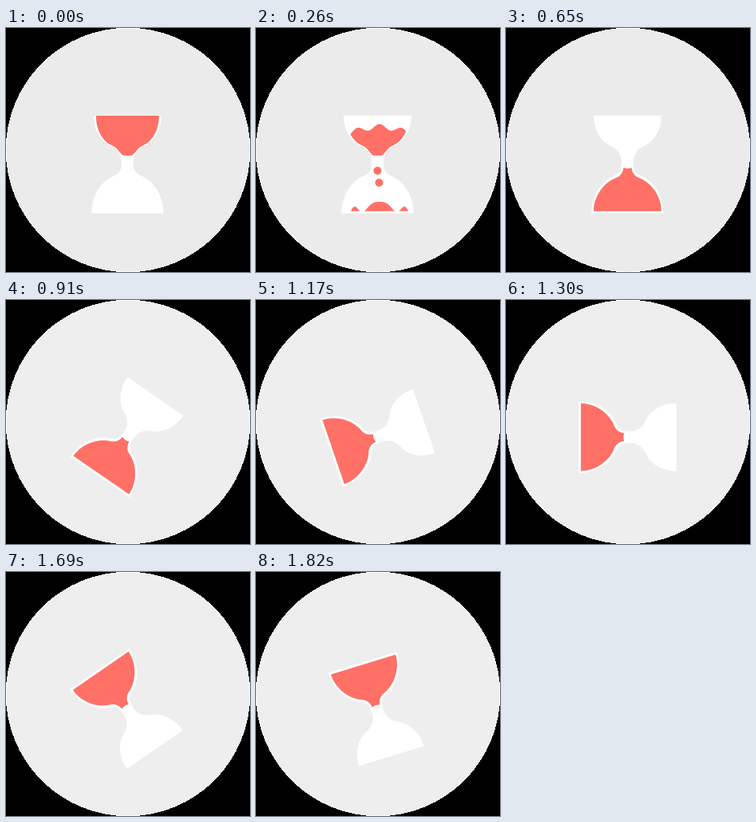
Write an HTML page that moves like this. It is 306 by 306 pixels and loops after 1950 ms.

```html
<!DOCTYPE html>
<html lang="en">
<head>
<meta charset="utf-8">
<title>Hourglass</title>
<style>
  html, body { margin: 0; width: 100%; height: 100%; overflow: hidden; background: #000; }
  svg { display: block; width: 100vw; height: 100vh; }
</style>
</head>
<body>
<svg viewBox="0 0 306 306">
  <defs>
    <clipPath id="upper"><path d="M-39.5-61H39.5C39.5-44 32-29 19-23.500C11-20.500 9-11 4-11H-4C-9-11-11-20.500-19-23.500C-32-29-39.5-44-39.5-61Z"/></clipPath>
    <clipPath id="lower"><path d="M-5 4Q0 6.500 5 4C6 12 10 15.500 16 17.500C29 23 42.300 39 42.500 58.700H-42.500C-42.300 39-29 23-16 17.500C-10 15.500-6 12-5 4Z"/></clipPath>
  </defs>
  <circle cx="153" cy="153" r="153.300" fill="#fff" shape-rendering="crispEdges"/>
  <circle id="disc" cx="153" cy="153" r="152.600"/>
  <g id="glass">
    <path fill="#fff" d="M-42.500-61.300H42.500C42.500-42 33-28 20-22.500C13-19.500 7.300-12 7.300-3C7.300 8 10 11.500 18 14.700C31 20 45 37 45.200 61.500H-45.200C-45 37-31 20-18 14.700C-10 11.500-7.300 8-7.300-3C-7.300-12-13-19.500-20-22.500C-33-28-42.500-42-42.500-61.300Z"/>
    <g fill="#ff7067">
      <path id="topSand" clip-path="url(#upper)"/>
      <path id="bottomSand" clip-path="url(#lower)"/>
      <g id="drops"><circle r="5"/><circle r="5"/></g>
    </g>
  </g>
</svg>
<script>
const STEP = 130, STEPS = 15, FALL = 5, TURN = STEPS - FALL;
const $ = id => document.getElementById(id);

// Pose of the sand while it falls: surface heights and wave sizes.
const poses = [
  { top: -75, topWave: 0, bottom: 70, bottomWave: 0, drops: [] },
  { top: -55, topWave: 3, bottom: 62, bottomWave: 4, drops: [[0, 0], [1, 14]] },
  { top: -47, topWave: 3.5, bottom: 52, bottomWave: 5, drops: [[0, 8], [2, 23]] },
  { top: -39.5, topWave: 3.8, bottom: 42.8, bottomWave: 5.8, drops: [[0.5, 15], [3.5, 29]] },
  { top: -22, topWave: 3, bottom: 29, bottomWave: 5, drops: [[0, 10]] },
  { top: 0, topWave: 0, bottom: -10, bottomWave: 0, drops: [] }
];

// Wavy surface with its crest at x = 2.5; a power above 1 tightens the outer waves.
function sand(level, wave, trough, power) {
  let d = 'M-48 75';
  for (let x = -48; x <= 48; x++) {
    const u = Math.abs(x - 2.5);
    const y = level - wave * Math.cos(Math.PI * (u / trough) ** power) + 0.006 * u * u;
    d += `L${x} ${y.toFixed(2)}`;
  }
  return d + 'L48 75Z';
}

function draw(now) {
  const step = Math.floor(now / STEP) % STEPS;
  const pose = poses[Math.min(step, FALL)];
  const turn = Math.max(0, step - FALL) / TURN;
  const angle = 180 * turn - 1.5 * Math.sin(2 * Math.PI * turn);
  $('disc').setAttribute('fill', turn ? '#eee' : '#ebebeb');
  $('glass').setAttribute('transform', `translate(152.4 171) rotate(${angle} -0.4 0.5)`);
  $('topSand').setAttribute('d', sand(pose.top, pose.topWave, 14, 1));
  $('bottomSand').setAttribute('d', sand(pose.bottom, pose.bottomWave, 21, 1.65));
  [...$('drops').children].forEach((drop, i) => {
    const at = pose.drops[i];
    drop.setAttribute('visibility', at ? 'visible' : 'hidden');
    if (at) drop.setAttribute('transform', `translate(${at})`);
  });
}

const start = performance.now();
function tick() {
  draw(performance.now() - start);
  requestAnimationFrame(tick);
}
tick();
</script>
</body>
</html>
```
